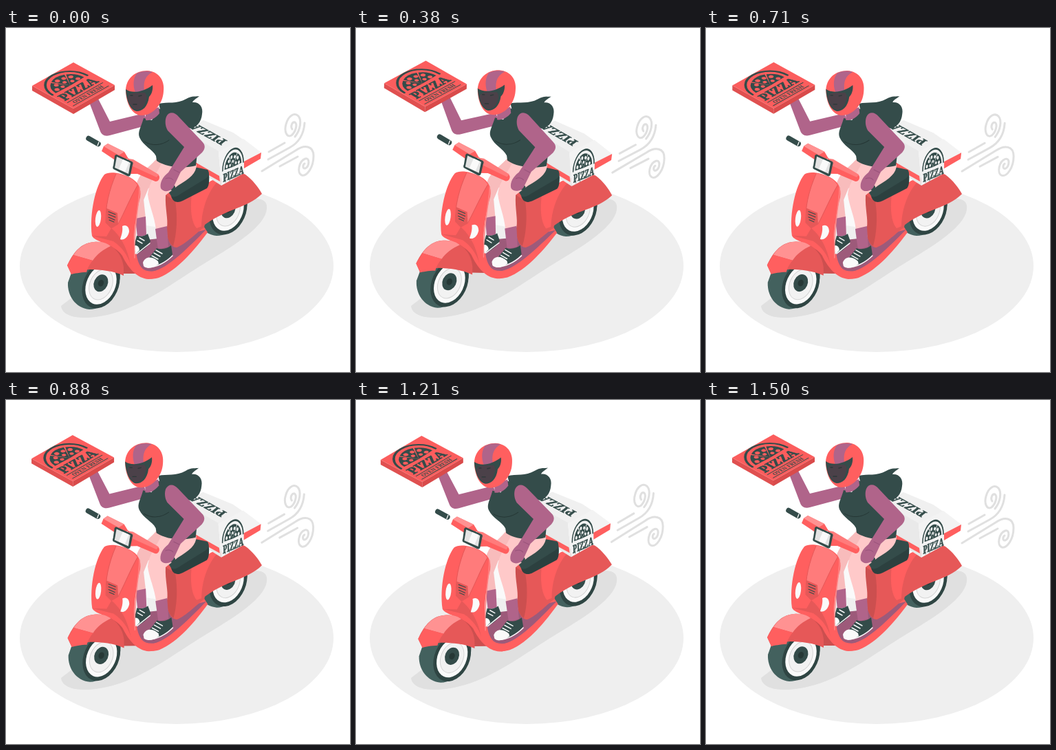
Write an HTML page that moves like this. It is 500 px wide and 500 px high and loops after 1540 ms.

```html
<!DOCTYPE html>
<html lang="en">
<head>
<meta charset="utf-8">
<title>Pizza delivery</title>
<style>
html, body { margin: 0; width: 100%; height: 100%; overflow: hidden; background: #fff; }
svg { display: block; width: 100vw; height: 100vh; }
.ink { fill: #344c4a; }
.red { fill: #ff5f5f; }
.deep { fill: #e65858; }
.dim { fill: #cc4f4f; }
.soft { fill: #ff7b7b; }
.pale { fill: #ff9292; }
.plum { fill: #b0648a; }
.skin { fill: #ffc9c9; }
.white { fill: #fafafa; }
.line { fill: none; stroke-linecap: round; stroke-linejoin: round; }
.wind { stroke: #e0e0e0; stroke-width: 3; }
.lace { stroke: #fafafa; stroke-width: 1.5; }
.trace { stroke: #344c4a; stroke-width: 1.1; }
text { font-family: "Noto Serif", "Liberation Serif", serif; font-weight: 900; fill: #344c4a; }
.brand { font-size: 18.5px; stroke: #344c4a; stroke-width: .7; }
.small { font-size: 7.5px; }
</style>
</head>
<body>
<svg viewBox="0 0 500 500">
  <defs>
    <g id="slice">
      <path class="ink" d="M0 0L-11 -21A23.7 23.7 0 0 1 11 -21Z"/>
      <g fill="currentColor">
        <circle cx="-4.2" cy="-17.5" r="3"/><circle cx="4.8" cy="-16" r="2.8"/><circle cx="-.2" cy="-9.5" r="2.5"/>
      </g>
    </g>
    <g id="logo">
      <path class="line" stroke="#344c4a" stroke-width="3" d="M-31 -4A29 29 0 0 1 27 -4"/>
      <g transform="translate(-2 -3)">
        <use href="#slice"/>
        <use href="#slice" transform="rotate(-60)"/>
        <use href="#slice" transform="rotate(60)"/>
      </g>
      <text class="brand" x="-30" y="15.5">PIZZA</text>
    </g>
    <g id="wheel">
      <path fill="#43615e" d="M90 370C89 389 101 407 121 409C143 409 166 384 166 358L160 338L100 342Z"/>
      <g transform="translate(138 373) rotate(24)">
        <ellipse rx="25.5" ry="36" fill="#2f4543"/>
        <ellipse rx="21" ry="30" class="white"/>
        <ellipse rx="16" ry="23" fill="#f2f2f2" stroke="#d5d5d5"/>
        <ellipse cx="-1" cy="-2" rx="10" ry="13" class="ink"/>
        <ellipse cx="-1" cy="-2" rx="4" ry="5" fill="#263836"/>
      </g>
    </g>
  </defs>

  <ellipse cx="248" cy="346" rx="228" ry="125" fill="#efefef"/>
  <path fill="#e0e0e0" d="M80 404C82 424 122 426 165 412C210 397 250 365 300 335C345 308 382 282 379 258C377 247 364 247 350 250L150 350Z"/>

  <g id="ride">
    <g class="line wind">
      <path d="M382 180L405 167M381 191L412 174C427 166 433 152 434 138"/>
      <path d="M416 147C413 143 416 136 420 137C424 140 421 151 415 156C408 160 404 150 407 140C410 128 419 122 425 128C430 134 428 148 420 158"/>
      <path d="M372 208L421 178C434 169 447 171 447 186C447 203 437 216 430 214C422 211 426 193 435 190C442 188 441 201 435 204C431 205 431 199 434 197M398 201L424 187"/>
    </g>

    <!-- rear of the scooter -->
    <use href="#wheel" x="185" y="-107"/>
    <path class="red" d="M178 338C188 362 204 368 222 363C250 352 276 320 293 297L284 283L235 303L190 326Z"/>
    <path fill="#9d5a7a" d="M189 318C189 344 199 356 213 354C236 349 264 320 291 293L250 303L203 308Z"/>
    <path class="white" d="M199 236L218 222L222 290L204 287Z"/>
    <path class="deep" d="M228 240L233 290C234 307 239 319 248 319C262 314 278 296 288 290L300 228L270 220Z"/>
    <path class="dim" d="M228 240L246 252C250 275 248 300 243 317C236 312 234 302 233 290Z"/>
    <path class="red" d="M270 242L298 222L326 212C302 228 288 256 285 288L277 291C268 280 268 258 270 242Z"/>
    <path class="deep" d="M284 290C284 256 300 222 322 213C332 209 342 210 348 213C358 220 368 233 372 241C350 263 318 262 284 290Z"/>

    <!-- delivery box -->
    <path fill="#f0f0f0" d="M258 150L287 134L330 152L346 163L309 181Z"/>
    <path fill="#e9e9e9" d="M258 150L309 179L313 229L266 199Z"/>
    <path fill="#f3f3f3" d="M309 180L345 161L371 181L346 197V211L313 229Z"/>
    <path class="red" d="M346 194L371 181L370 190L346 204ZM268 191L310 215L311 223L268 199Z"/>
    <g style="color:#f3f3f3" transform="matrix(.52 -.22 0 .86 331 204)"><use href="#logo"/></g>
    <path class="line trace" opacity=".6" d="M319 219v5M325 217v5M332 214v3"/>
    <text class="brand" transform="matrix(-.85 -.47 .65 -.5 286 157)" x="-31" y="15">PIZZA</text>

    <path fill="#2c403f" d="M240 244C242 253 249 255 257 251L292 233C296 229 296 215 294 208L265 215Z"/>
    <path class="ink" d="M240 244L232 232L274 202L293 206C296 210 295 216 290 219L254 241C249 245 243 247 240 244Z"/>

    <!-- far leg -->
    <path fill="#f8bcbc" d="M219 190L243 197L224 224L207 233L200 250L203 277L189 279L187 246C187 232 190 221 197 212C204 204 212 198 219 190Z"/>
    <path class="plum" d="M188 277L203 274L204 301L191 304Z"/>
    <path class="ink" d="M190 302C196 304 202 302 206 299L210 310C207 317 197 326 188 328L186 318Z"/>
    <path class="white" d="M186 317C190 314 194 319 194 323L188 329Z"/>
    <path class="line lace" d="M191 309l7 4M194 305l7 4M190 328L209 313"/>

    <!-- near leg -->
    <path class="skin" d="M228 193L277 198C277 211 267 219 250 229L232 243C231 262 236 278 234 290L218 293C216 274 208 258 206 242C207 225 220 211 228 193Z"/>
    <path class="plum" d="M217 292L234 288L236 318L221 322Z"/>
    <path class="ink" d="M219 320C227 323 235 320 240 316L242 329C236 337 225 343 215 347L204 339Z"/>
    <path class="white" d="M199 341C202 332 212 331 221 339L222 343C213 350 203 350 200 346Z"/>
    <path class="line lace" d="M212 331l9 5M215 327l9 5M218 323l9 5M206 348C218 348 232 341 242 331"/>

    <!-- front wheel, fender and shield -->
    <use href="#wheel"/>
    <path class="dim" d="M128 318C150 305 170 320 187 345L190 357L168 357Z"/>
    <path class="red" d="M143 213C150 208 166 210 180 217C193 224 197 233 195 246C187 278 184 312 188 334C191 348 201 356 218 353C230 350 246 338 258 327C246 348 226 365 207 365C191 364 178 350 169 331C158 314 128 311 125 302C121 270 130 229 143 213Z"/>
    <path class="deep" d="M125 302L146 303L153 291C166 302 176 318 181 344C177 330 168 318 156 310Z"/>
    <path class="soft" d="M160 212C173 212 187 220 191 229C181 246 172 268 163 285L153 291L145 283C144 260 150 235 160 212Z"/>
    <path class="deep" d="M146 262L162 269L163 285L153 291L145 283Z"/>
    <path class="line" stroke="#e65858" d="M160 212C150 235 144 260 145 283L153 291L163 285C172 268 181 246 191 229"/>
    <path class="line" stroke="#ff8585" stroke-width="1.5" d="M194 232C195 250 185 285 187 334"/>
    <path class="line trace" d="M149 267l10 4M149 271l10 4M149 275l9 4M150 279l7 3"/>
    <ellipse class="white" cx="134" cy="277" rx="4" ry="12" transform="rotate(7 134 277)"/>
    <path class="white" d="M169 288C175 285 179 289 179 296C177 305 171 309 166 307C168 301 170 295 169 288Z"/>

    <path class="deep" d="M89 345C96 330 107 312 128 311C151 309 169 326 171 348L171 360C157 353 137 351 121 351C109 353 98 356 95 358Z"/>
    <path class="pale" d="M98 330C106 318 116 312 128 311C140 310 147 313 152 317C141 322 132 329 126 338Z"/>
    <path class="red" d="M98 330L126 338C121 344 118 350 117 355C108 355 99 357 95 358L89 345Z"/>

    <!-- handlebar and headlight -->
    <path class="line" stroke="#344c4a" stroke-width="7.5" d="M120 160.500L134 168.500"/>
    <path class="line" stroke="#fafafa" stroke-width="1.3" d="M135 166l-2 5"/>
    <path class="red" d="M139 179L142 172L148 168L172 180L178 190L160 193Z"/>
    <path class="pale" d="M142 172L148 168L172 180L164 185Z"/>
    <path class="red" d="M177 189L222 214C225 218 221 224 217 223L191 212L178 212Z"/>
    <path class="soft" d="M178 190L185 191L222 213L219 217L182 200Z"/>
    <path class="ink" d="M161 184L183 194C185 195 185 197 184 199L181 213C180 216 178 216 176 215L156 205C155 204 155 202 156 200L158 186C159 184 160 184 161 184Z"/>
    <path fill="#e3e3e3" d="M161 187L181 196L178 212L158 203Z"/>
    <path class="white" d="M170 191L179 195L173 209L164 205Z"/>

    <!-- raised arm, hair, body -->
    <path class="plum" d="M121 108L133 101L151 136L201 124L207 141L151 156C143 158 139 155 137 150Z"/>
    <path class="ink" d="M222 110C235 107 248 111 262 103C270 98 277 100 281 99C276 103 272 105 271 108C281 107 287 115 285 125C284 137 277 144 268 146C258 142 245 132 225 122Z"/>
    <path class="ink" d="M200 131C196 145 191 151 194 159C200 172 213 176 218 186L219 193C235 204 262 204 276 200L278 182C270 165 265 150 241 125L222 117L212 134Z"/>
    <path class="line" stroke="#263836" d="M201 165C212 172 226 171 237 163"/>
    <path class="plum" d="M203 122L222 115L223 124C217 132 209 135 203 134Z"/>
    <path class="line" stroke="#344c4a" stroke-width="8" d="M234 229L242 232"/>
    <path class="plum" d="M233 129C237 121 245 122 251 129L285 165C290 170 290 175 285 181L254 209L245 228C242 238 229 240 225 233C223 225 228 216 236 210L259 173L235 149C231 142 231 134 233 129Z"/>
    <path class="line" stroke="#98527a" d="M232 219C236 217 241 218 243 221M244 206L252 210"/>

    <!-- helmet -->
    <path class="red" d="M174 92C174 73 188 62 205 62C222 63 231 76 229 92C228 112 212 128 196 127C184 126 175 112 174 92Z"/>
    <path class="plum" d="M190 66C198 62 206 62 213 64C203 69 199 78 201 91L188 94C184 83 185 73 190 66Z"/>
    <path class="ink" d="M174 89C184 96 200 93 213 83C214 91 211 97 208 100C206 115 198 121 190 121C180 119 175 105 174 89Z"/>
    <path fill="#4b4149" d="M177 100C180 92 192 95 202 94C205 97 205 102 203 106C201 115 195 119 190 119C183 117 178 109 177 100Z"/>
    <path class="line" stroke="#2c3938" stroke-width="1.4" d="M181 98l3 0M193 99l4 -1M185 111l5 0"/>

    <!-- carried pizza -->
    <path fill="#e05050" d="M38 84L98 117V125L38 91Z"/>
    <path fill="#d94b4b" d="M98 117L158 83V90L98 125Z"/>
    <path fill="#fb5d5d" d="M38 84L98 50L158 83L98 117Z"/>
    <g style="color:#fb5d5d" transform="matrix(.87 -.49 .87 .49 98 84)">
      <use href="#logo"/>
      <path class="line trace" d="M-30 20H29M-30 29.500H29"/>
      <text class="small" x="-25" y="27.5">OVEN FRESH</text>
    </g>
  </g>
</svg>
<script>
const ride = document.getElementById('ride');
const LOOP = 1540, FPS = 24, STEPS = 36;

// Sway: 0 to 1 degree, through to -1, and back to 0, all linear.
function sway(p) {
  if (p < .25) return p * 4;
  return p < .75 ? 2 - p * 4 : p * 4 - 4;
}

function draw(now) {
  const step = Math.floor((now % LOOP + 3.4) * FPS / 1000);
  const angle = sway(Math.min(step, STEPS) / STEPS);
  ride.setAttribute('transform', `rotate(${angle.toFixed(3)} 250 250)`);
  requestAnimationFrame(draw);
}
draw(0);
</script>
</body>
</html>
```
